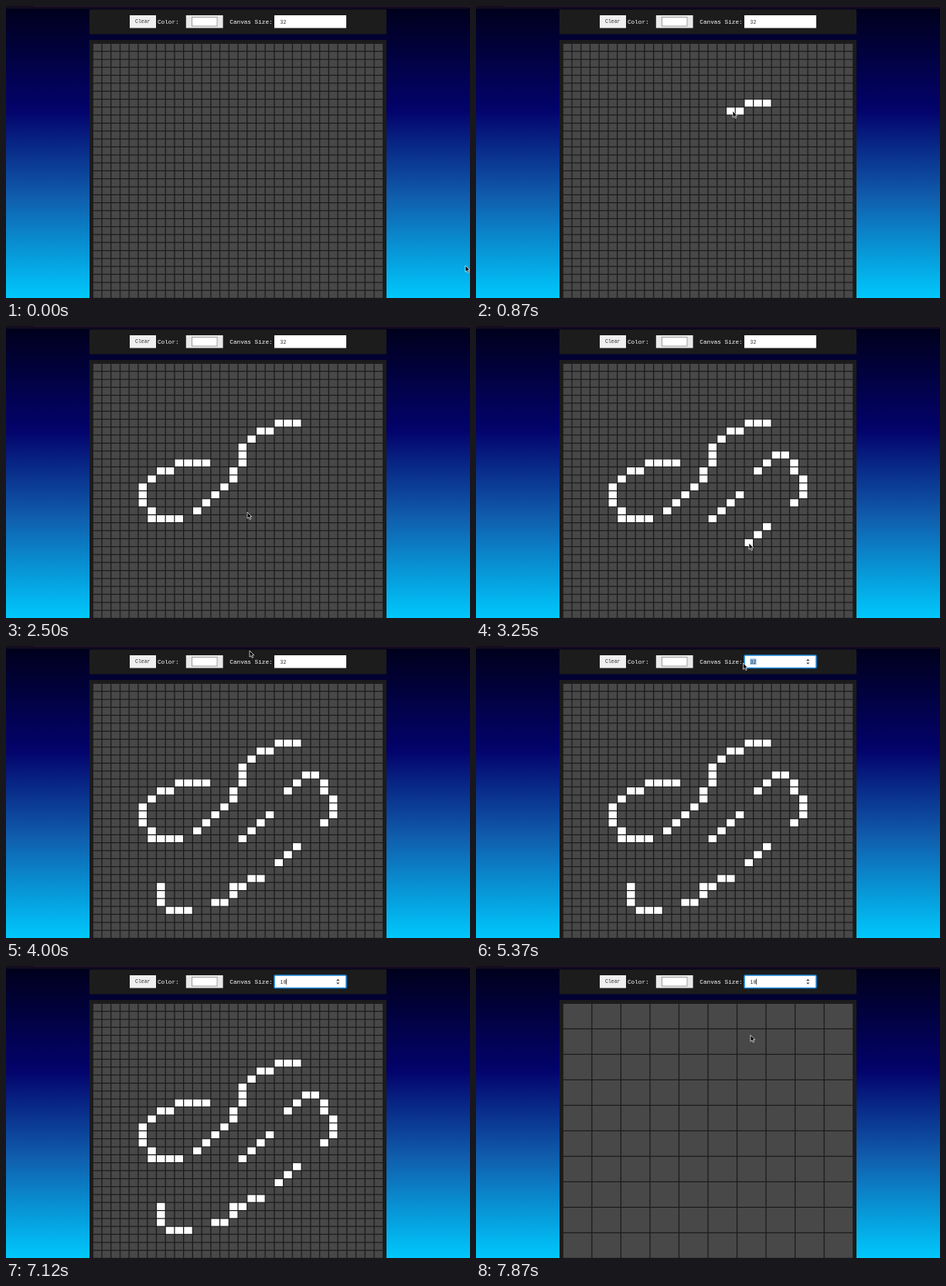
These frames come from a looping animation (600 by 378 pixels, 8 s). An HTML page:

```html
<!DOCTYPE html>
<html lang="en">
<head>
<meta charset="utf-8">
<title>Pixel sketch pad</title>
<style>
  html, body { margin: 0; width: 100%; height: 100%; overflow: hidden; background: #00001c; }
  svg { display: block; width: 100vw; height: 100vh; }
  text { font-family: "Liberation Mono", "Courier New", monospace; white-space: pre; }
  .label { font-size: 7.7px; fill: #fff; }
  .small { font-size: 6.5px; fill: #333; }
</style>
</head>
<body>
<svg viewBox="0 0 600 378" preserveAspectRatio="none">
  <defs>
    <linearGradient id="sky" x2="0" y2="1">
      <stop offset="0" stop-color="#00001a"/>
      <stop offset=".36" stop-color="#03036c"/>
      <stop offset=".66" stop-color="#105fae"/>
      <stop offset="1" stop-color="#00c8fc"/>
    </linearGradient>
  </defs>
  <rect width="600" height="378" fill="url(#sky)"/>
  <rect width="600" height="3.5" fill="#120c1e"/>
  <rect x="36" width="564" height="1" fill="#25162a"/>
  <rect x="108" y="4.5" width="384" height="32" fill="#1c1c1c"/>
  <rect x="108" y="44" width="384" height="334" fill="#1c1c1c"/>

  <rect x="160" y="12" width="34" height="16.5" fill="#efefef"/>
  <text class="small" x="167" y="22.3">Clear</text>
  <text class="label" x="196" y="23">Color:</text>
  <rect x="232.8" y="12" width="47.8" height="16.5" fill="#e9e9e9"/>
  <rect x="240.5" y="14.5" width="32.5" height="11.5" fill="#fff" stroke="#8a8a8a" stroke-width=".8"/>
  <text class="label" x="289.3" y="23">Canvas Size:</text>

  <rect x="347" y="12" width="93" height="16.5" fill="#fff"/>
  <g id="focus">
    <rect x="347" y="12" width="93" height="16.5" rx="1" fill="none" stroke="#1c86d6" stroke-width="1.6"/>
    <path d="M427 19.2l2.2-2.4 2.2 2.4zM427 21.4l2.2 2.4 2.2-2.4z" fill="#444"/>
  </g>
  <rect id="mark" x="354.3" y="16.3" width="8.2" height="8" fill="#8fc1ee"/>
  <text id="size" class="small" x="354.5" y="22.5"></text>
  <rect id="caret" y="16.5" width=".7" height="7.5" fill="#111"/>

  <path id="cells" fill="#484848"/>
  <path id="ink" fill="#fff"/>

  <path id="arrow" d="M0 0V8.2L1.9 6.5 3.2 9.4 4.6 8.8 3.3 5.9H5.8Z" fill="#000" stroke="#fff" stroke-width=".7"/>
  <path id="beam" d="M-1.3-4H1.3M0-4V4M-1.3 4H1.3" fill="none" stroke="#222" stroke-width=".7"/>
</svg>
<script>
const LOOP = 8000, TICK = 125;
const $ = id => document.getElementById(id);
const show = (id, on) => $(id).setAttribute("visibility", on ? "visible" : "hidden");

// Pointer stops, one per tick from the named tick on; each holds until the next.
const moves = {
  0: "594,336 484,172",
  3: "440,140 400,126 377,125 353,126 332,136 313,147 307,162 298,190 279,212 " +
     "253,235 222,250 192,248 177,222 186,198 220,178 256,177 290,206 312,241 " +
     "322,234 366,186 400,166 422,190 412,228 353,281 306,310 270,332 234,342 " +
     "212,342 200,312 315,6 328,12 350,18 370,20",
  38: "365,20 361,20",
  41: "356,20 350,21 345.5,22",
  61: "358,20",
  63: "355,89.5"
};
const track = [];
for (const start in moves)
  moves[start].split(" ").forEach((p, i) => track[+start + i] = p.split(",").map(Number));
for (let k = 1; k < LOOP / TICK; k++) track[k] ||= track[k - 1];

// Strokes: first tick, last tick, start column, start row, numpad directions.
const strokes = [
  [5, 11, 22, 7, "44141122121"],
  [12, 12, 13, 16, "11"],
  [13, 18, 9, 19, "44487889969666"],
  [21, 21, 16, 19, "999"],
  [22, 23, 21, 13, "996"],
  [24, 25, 25, 12, "23221"],
  [26, 26, 22, 20, "11"],
  [27, 28, 18, 24, "414214"],
  [29, 31, 10, 28, "44788"]
].map(([from, to, col, row, steps]) => {
  const cells = [[col, row]];
  for (const d of steps) {
    col += (d - 1) % 3 - 1;
    row += 1 - Math.floor((d - 1) / 3);
    cells.push([col, row]);
  }
  return { from, to, cells };
});

function cellPath(col, row, n) {
  const w = 375.4 / n, h = 330 / n, gap = 1.3;
  return `M${112.3 + col * w + gap / 2} ${48.4 + row * h + gap / 2}` +
    `h${w - gap}v${h - gap}h${gap - w}z`;
}

function gridPath(n) {
  let d = "";
  for (let i = 0; i < n * n; i++) d += cellPath(i % n, Math.floor(i / n), n);
  return d;
}
const grids = { 32: gridPath(32), 10: gridPath(10) };

function inkPath(k) {
  let d = "";
  for (const { from, to, cells } of strokes) {
    const part = Math.max(0, Math.min(1, (k - from + 1) / (to - from + 1)));
    for (const [c, r] of cells.slice(0, Math.floor(cells.length * part))) d += cellPath(c, r, 32);
  }
  return d;
}

function draw(k) {
  const n = k < 58 ? 32 : 10;
  $("cells").setAttribute("d", grids[n]);
  $("ink").setAttribute("d", n === 32 ? inkPath(k) : "");

  const value = k < 50 ? "32" : k < 53 ? "1" : "10";
  $("size").textContent = value;
  $("caret").setAttribute("x", 354.5 + value.length * 3.9);
  show("focus", k >= 36);
  show("mark", k >= 42 && k < 50);
  show("caret", k >= 50);

  const [x, y] = track[k];
  const shown = k < 49 || k >= 61;
  const inField = x > 347 && x < 440 && y > 12 && y < 28;
  for (const id of ["arrow", "beam"]) $(id).setAttribute("transform", `translate(${x} ${y})`);
  show("arrow", shown && !inField);
  show("beam", shown && inField);
}

let last = -1;
const start = performance.now();
function frame() {
  const t = (performance.now() - start) % LOOP;
  const k = Math.min(LOOP / TICK - 1, Math.floor((t + 5) / TICK));
  if (k !== last) draw(last = k);
  requestAnimationFrame(frame);
}
frame();
</script>
</body>
</html>
```
